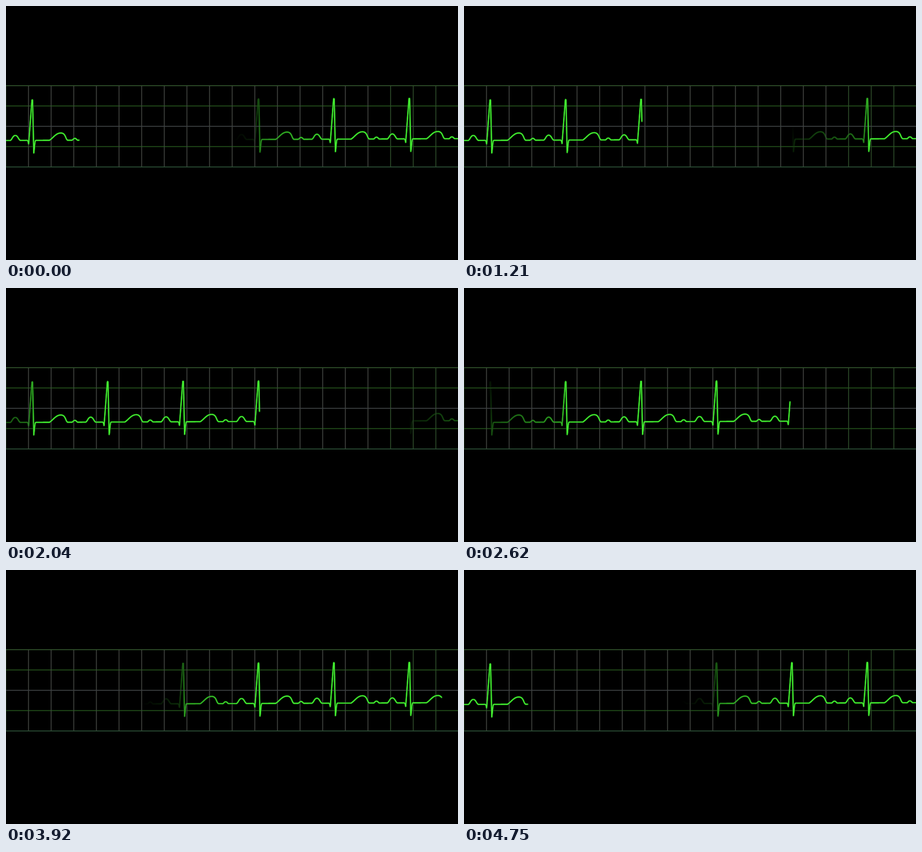
Write an HTML page with a canvas that moves like this. It is 998 by 561 pixels and loops after 4.79 s.

```html
<!DOCTYPE html>
<html lang="en">
<head>
<meta charset="utf-8">
<title>Heart monitor</title>
<style>
  html, body { margin: 0; width: 100%; height: 100%; overflow: hidden; background: #000; }
  canvas { display: block; }
</style>
</head>
<body>
<canvas id="stage" width="998" height="561"></canvas>
<script>
const WIDTH = 998, HEIGHT = 561;
const FRAMES = 115, FPS = 24, LOOP = 4790;
const BEATS = 6, SAMPLES = 1640;
const FADE_END = 0.337, FADE_START = 0.533; // share of the loop left before overwriting

const ctx = document.getElementById('stage').getContext('2d');

// One heartbeat relative to the baseline: P wave, QRS spike, T wave, U wave
const BEAT = 'h9.5c4-2 5.5-11 11-11s7 9 11 11h15c2 0 2.5 3 3.5 8' +
  'l7.3-97q.7-1 1.4 0l2.6 117c1.8-10 1.7-28 4.7-28' +
  'h30c8-5 14-16 25-16s10 13 15 16h10c2-1 3-4 6-4s4 3 6 4h8.5';

function makePath(d) {
  const path = document.createElementNS('http://www.w3.org/2000/svg', 'path');
  path.setAttribute('d', 'M0 0' + d);
  return path;
}

const beatLength = makePath(BEAT).getTotalLength();
const startPhase = (beatLength - 6.5) / beatLength / BEATS;

// Evenly spaced along the curve, so the beam keeps a constant speed
const trace = makePath(BEAT.repeat(BEATS));
const traceLength = trace.getTotalLength();
const points = Array.from({ length: SAMPLES + 1 }, (_, i) => {
  const { x, y } = trace.getPointAtLength(i / SAMPLES * traceLength);
  return { x, y: y + 297 - 4 * x / WIDTH };
});

function line(x1, y1, x2, y2, color, width) {
  ctx.strokeStyle = color;
  ctx.lineWidth = width;
  ctx.beginPath();
  ctx.moveTo(x1, y1);
  ctx.lineTo(x2, y2);
  ctx.stroke();
}

function drawGrid() {
  for (let i = 0; i < 20; i++) {
    const x = i * 49.97 - 0.3;
    line(x, 176, x, 355.5, i === 0 || i > 16 ? '#2a4626' : '#3d403c', 2);
  }
  ['#30502a', '#24501a', '#3c4042', '#22501a', '#2c5036'].forEach((color, i) => {
    const y = 176 + i * 44.85;
    line(0, y, WIDTH, y, color, 2);
  });
}

function drawTrace(phase) {
  for (const [r, g, b, width] of [[8, 62, 6, 4.4], [70, 242, 50, 2.1]]) {
    for (let i = 0; i < SAMPLES; i++) {
      const ahead = (i / SAMPLES - phase + 1) % 1;
      const level = Math.min(1, (ahead - FADE_END) / (FADE_START - FADE_END));
      if (level <= 0) continue;
      const p = points[i], q = points[i + 1];
      line(p.x, p.y, q.x, q.y, `rgb(${r * level},${g * level},${b * level})`, width);
    }
  }
}

function draw(now) {
  const frame = Math.floor((now % LOOP + 5) * FPS / 1000) % FRAMES;
  ctx.globalCompositeOperation = 'source-over';
  ctx.fillStyle = '#000';
  ctx.fillRect(0, 0, WIDTH, HEIGHT);
  ctx.globalCompositeOperation = 'lighten';
  ctx.lineCap = 'butt';
  drawGrid();
  ctx.lineCap = 'round';
  drawTrace((startPhase + frame / FRAMES) % 1);
  requestAnimationFrame(draw);
}
requestAnimationFrame(draw);
</script>
</body>
</html>
```
